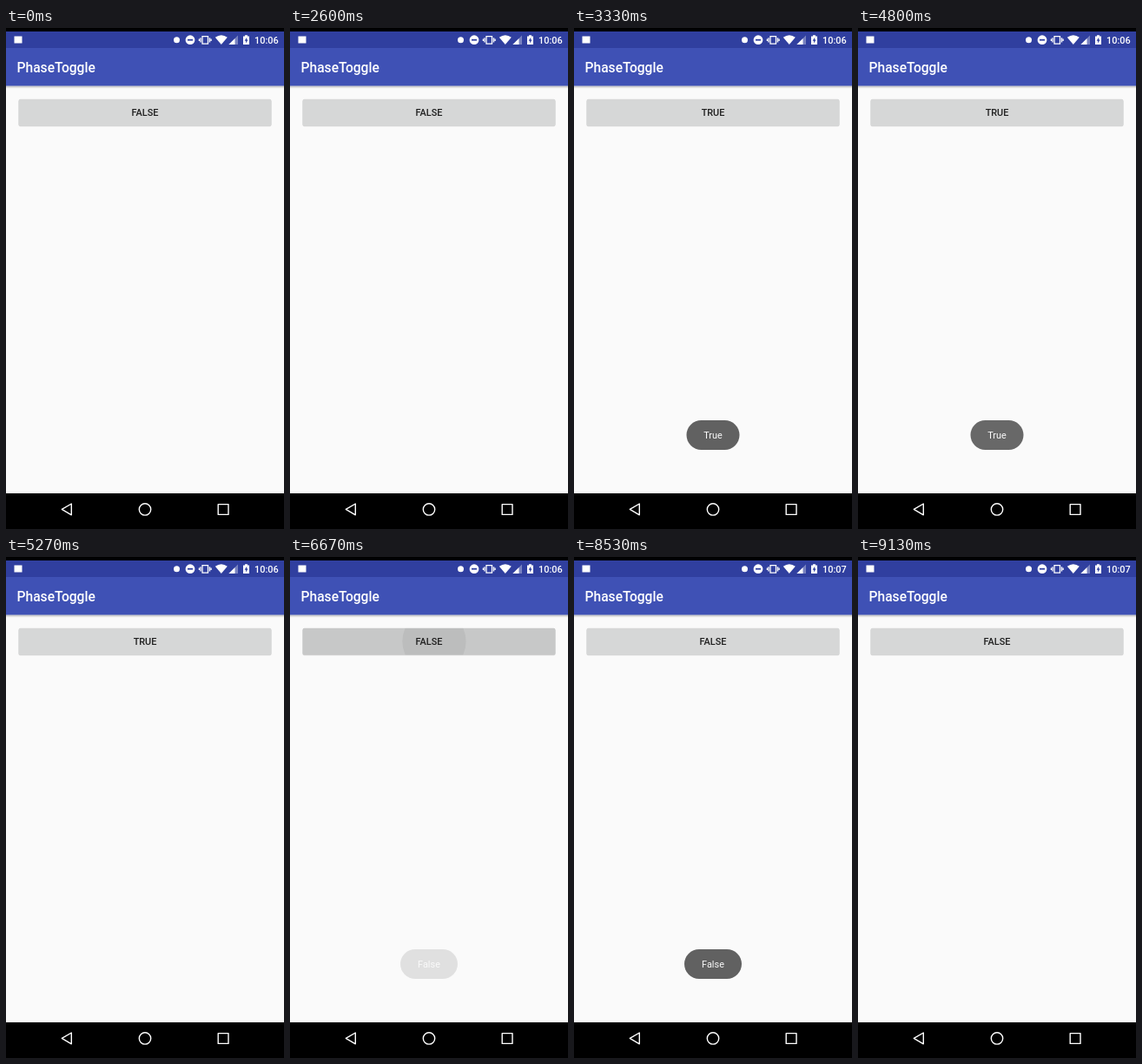
Animation, 320 px wide and 576 px high, one loop 9190 ms. Source, as an HTML page:

```html
<!DOCTYPE html>
<html lang="en">
<head>
<meta charset="utf-8">
<title>Toggle button demo</title>
<style>
  html, body { margin: 0; width: 100%; height: 100%; overflow: hidden; background: #000; }
  svg { display: block; width: 320px; height: 576px; }
  text { font: 10.9px Roboto, sans-serif; }
  .medium { font-weight: 500; }
  .center { text-anchor: middle; }
</style>
</head>
<body>
<svg viewBox="0 0 320 576">
  <defs>
    <linearGradient id="shadow" x2="0" y2="1">
      <stop stop-color="#000" stop-opacity=".26"/>
      <stop offset="1" stop-color="#000" stop-opacity="0"/>
    </linearGradient>
    <clipPath id="buttonShape"><rect x="14.5" y="81.8" width="291" height="30.7" rx="2"/></clipPath>
  </defs>

  <rect y="66" width="320" height="469" fill="#fafafa"/>
  <rect y="66.3" width="320" height="3.5" fill="url(#shadow)"/>
  <rect y="4" width="320" height="19" fill="#303f9f"/>
  <rect y="23" width="320" height="43.5" fill="#3f51b5"/>
  <text class="medium" x="12.5" y="50.5" fill="#fff" style="font-size:15.6px">PhaseToggle</text>

  <!-- status icons -->
  <g fill="#fff">
    <rect x="9.5" y="9.5" width="9" height="8"/>
    <circle cx="196.5" cy="13.8" r="3.5"/>
    <circle cx="212" cy="13.7" r="5.4"/>
    <rect x="209" y="12.8" width="6" height="1.8" fill="#303f9f"/>
    <path d="M226 9.6h6.5v8.6H226zM224 11.2v5.2M234.5 11.2v5.2M222.4 12.6v2.4M236.1 12.6v2.4" fill="none" stroke="#fff" stroke-width="1.3"/>
    <path d="M240.8 10.8q7-5 14 0L247.8 19z"/>
    <path d="M267 8.6V19H256.4z" opacity=".35"/>
    <path d="M263.5 12V19H256.4z"/>
    <path d="M273 9.5h2V8.2h3v1.3h2V19h-7z"/>
    <path d="M277.2 10.8l-2.6 4h1.5v2.8l2.5-4h-1.4z" fill="#303f9f"/>
    <text id="clock" class="medium" x="286" y="17.8"></text>
  </g>

  <rect x="14.5" y="82.6" width="291" height="30.7" rx="2" opacity=".15"/>
  <g clip-path="url(#buttonShape)">
    <rect x="14" y="81" width="292" height="32" fill="#d6d7d7"/>
    <rect id="highlight" x="14" y="81" width="292" height="32"/>
    <circle id="ripple" cy="97"/>
  </g>
  <text id="label" class="medium center" x="160" y="101.3" fill="#1f1f1f"></text>

  <g id="toast">
    <rect id="toastBox" y="451" height="34" rx="17" fill="#616161"/>
    <text id="toastText" class="center" x="160" y="472" fill="#fafafa"></text>
  </g>

  <!-- navigation bar -->
  <rect y="535" width="320" height="41"/>
  <g fill="none" stroke="#fff" stroke-width="1.4" stroke-linejoin="round">
    <path d="M64.3 553.4L75.3 547v12.8z"/>
    <circle cx="160" cy="553.4" r="6.7"/>
    <rect x="244.2" y="547.6" width="11.8" height="11.8"/>
  </g>
</svg>
<script>
const LOOP = 9190;
const CLOCK_TICK = 7000;
const taps = [
  { press: 2600, release: 2725, hide: 4670, name: 'True', width: 61 },
  { press: 6400, release: 6585, hide: 8530, name: 'False', width: 66 }
];
const CLICK_DELAY = 40;
const TOUCH_X = 169.5;
const RIPPLE_RADIUS = 98;

const el = id => document.getElementById(id);
const set = (id, attributes) => {
  for (const key in attributes) el(id).setAttribute(key, attributes[key]);
};
const progress = (t, start, duration) => Math.min(1, Math.max(0, (t - start) / duration));
const decelerate = p => 1 - (1 - p) ** 2;
const logDecelerate = p => (1 - 400 ** (-p / 1.4)) / (1 - 400 ** (-1 / 1.4));

function draw(t) {
  const { press, release, hide, name, width } = t < taps[1].press ? taps[0] : taps[1];
  const click = release + CLICK_DELAY;
  const on = (t >= click) === (name === 'True');

  el('clock').textContent = t < CLOCK_TICK ? '10:06' : '10:07';
  el('label').textContent = on ? 'TRUE' : 'FALSE';

  // The highlight follows the press; the ripple only spreads after release.
  set('highlight', { opacity: 0.085 * progress(t, press, 120) * (1 - progress(t, release, 480)) });
  const spread = logDecelerate(progress(t, release, 800));
  set('ripple', {
    cx: TOUCH_X + (160 - TOUCH_X) * spread,
    r: RIPPLE_RADIUS * spread,
    opacity: 0.07 * (1 - progress(t, release, 400))
  });

  const shown = decelerate(progress(t, click, 550));
  const hidden = progress(t, hide, 570) ** 2;
  set('toast', { opacity: shown * (1 - hidden) });
  set('toastBox', { x: 160 - width / 2, width });
  el('toastText').textContent = name;
}

const start = performance.now();
function tick() {
  draw((performance.now() - start) % LOOP);
  requestAnimationFrame(tick);
}
tick();
</script>
</body>
</html>
```
